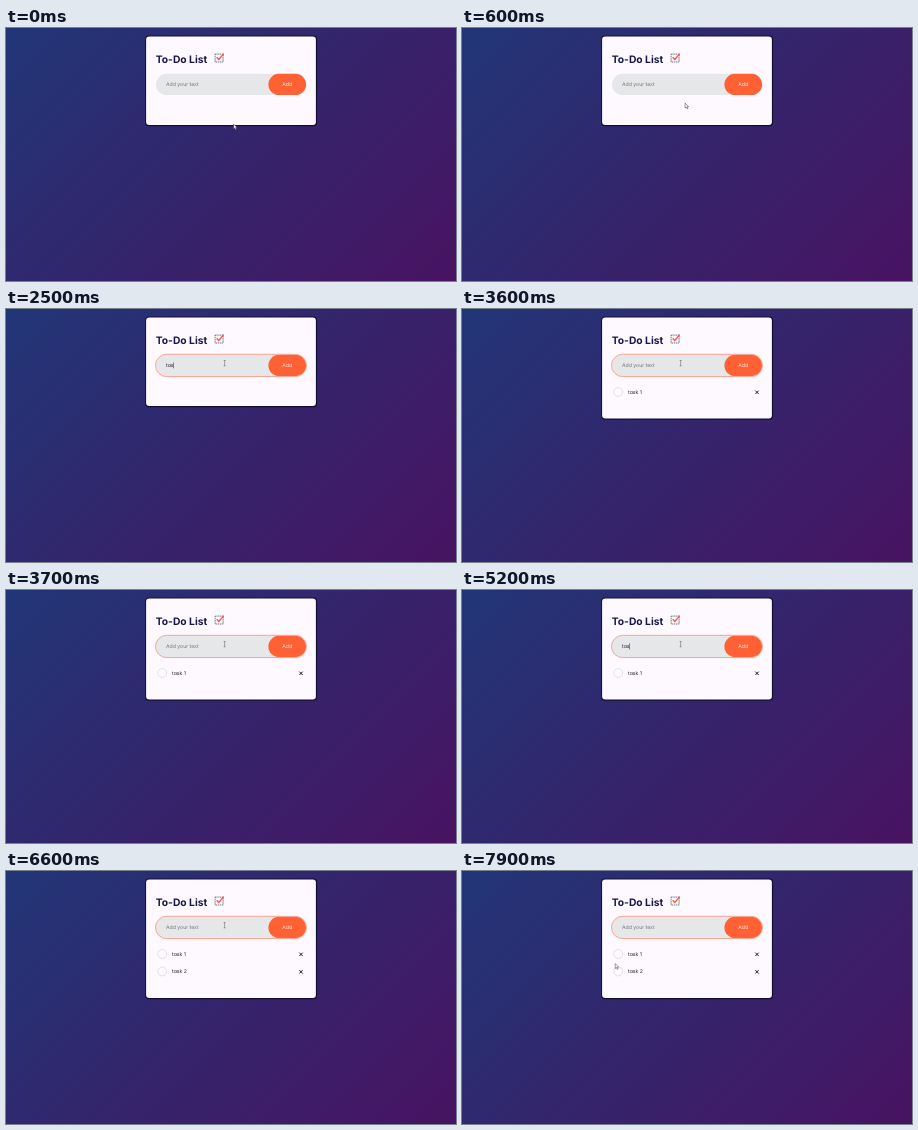
Animation of 450 by 253 pixels, one loop 8000 ms. Source, as an HTML page:

```html
<!DOCTYPE html>
<html lang="en">
<head>
<meta charset="utf-8">
<title>To-Do List</title>
<style>
  html, body { margin: 0; width: 100%; height: 100%; overflow: hidden; }
  body { background: linear-gradient(135deg, #213677, #481361); }
  svg { display: block; width: 100%; height: 100%; }
  text {
    font: 5.15px Inter, "Open Sans", sans-serif;
    font-feature-settings: "cv11", "ss03";
    fill: #25232c;
    white-space: pre;
    text-rendering: geometricPrecision;
  }
  .title { font-size: 10.3px; font-weight: 700; fill: #171848; }
  .hint { fill: #77777c; }
  .button { fill: #fff1ea; }
  #shadow { filter: blur(.4px); }
</style>
</head>
<body>
<svg viewBox="0 0 450 253">
  <rect id="shadow" x="139.2" y="7.6" width="171.9" rx="3.8" fill="#120e33"/>
  <rect id="card" x="140.1" y="8.5" width="169.8" rx="3.2" fill="#fdf9ff"/>

  <text class="title" x="149.7" y="34.7">To-Do List</text>
  <g fill="none">
    <rect x="209.1" y="26.1" width="8" height="7.9" stroke="#3a3b50" stroke-width=".7" stroke-dasharray="1.5 .7"/>
    <path d="M210.7 29.2 L212.8 31.5 L217.8 25.7" stroke="#f25545" stroke-width="1.3"/>
  </g>

  <rect x="150" y="45.8" width="150" height="21.3" rx="10.65" fill="#e6e7e9"/>
  <rect x="262.4" y="45.8" width="37.7" height="21.3" rx="10.65" fill="#ff6034"/>
  <rect id="ring" x="149.5" y="45.3" width="151" height="22.3" rx="11.15" fill="none" stroke="#f3a391" stroke-width="1"/>
  <text class="button" x="281.2" y="58.1" text-anchor="middle">Add</text>
  <text id="hint" class="hint" x="160" y="58.1">Add your text</text>
  <text id="typed" x="160" y="58.1"></text>
  <rect id="caret" y="53.4" width=".5" height="6" fill="#222"/>

  <g id="items"></g>

  <g id="arrow">
    <path d="M0 0 V4.9 L1.2 3.9 L2 5.7 L2.9 5.3 L2.1 3.6 H3.5 Z" fill="#fff" stroke="#222" stroke-width=".45"/>
  </g>
  <path id="beam" d="M-1 -2.7 H1 M0 -2.7 V2.7 M-1 2.7 H1" fill="none" stroke="#555" stroke-width=".5"/>
</svg>
<script>
const LOOP = 8000, TICK = 100;
const $ = id => document.getElementById(id);
const [shadow, card, ring, hint, typed, caret, items, arrow, beam] =
  ["shadow", "card", "ring", "hint", "typed", "caret", "items", "arrow", "beam"].map($);

const itemMarkup = (label, y) => `
  <g transform="translate(0 ${y})">
    <circle cx="156.2" cy="0" r="4.4" fill="#fefbff" stroke="#ddd6e4" stroke-width=".8"/>
    <text x="166" y="1.9">${label}</text>
    <path d="M293.3 -1.4 l3.4 3.4 m0 -3.4 l-3.4 3.4" stroke="#17151f" stroke-width=".95"/>
  </g>`;
items.innerHTML = itemMarkup("task 1", 83) + itemMarkup("task 2", 100.5);

// [time, value] pairs; the last one reached holds
const typing = [
  [0, ""], [2200, "t"], [2300, "ta"], [2500, "tas"], [2700, "task"], [2900, "task "], [3000, "task 1"],
  [3600, ""], [4900, "t"], [5000, "ta"], [5200, "tas"], [5400, "task"], [5600, "task "], [5800, "task 2"],
  [6600, ""]
];
const caretShown = [
  [0, false], [1000, true], [1500, false], [2100, true], [3600, false], [4100, true],
  [4600, false], [4900, true], [6400, false], [6900, true], [7400, false]
];
const taskCount = [[0, 0], [3600, 1], [6600, 2]];
const cardBottom = [97, 109.5, 127];

const at = (steps, t) => steps.filter(s => s[0] <= t).pop()[1];
const ease = p => p * p * (3 - 2 * p);
const progress = (t, from, to) => ease(Math.min(1, Math.max(0, (t - from) / (to - from))));
const show = (el, on) => el.setAttribute("visibility", on ? "visible" : "hidden");
const place = (el, x, y) => el.setAttribute("transform", `translate(${x} ${y})`);

function pointer(t) {
  const enter = progress(t, 200, 1000), leave = progress(t, 7500, 7900);
  return [
    227.6 - 9 * enter - 65.4 * leave,
    96 - 41.8 * enter + 38.4 * leave
  ];
}

function draw(t) {
  const text = at(typing, t), count = at(taskCount, t);
  const height = cardBottom[count] - 8.5;
  card.setAttribute("height", height);
  shadow.setAttribute("height", height + 2.1);
  [...items.children].forEach((item, i) => show(item, i < count));

  show(ring, t >= 1000);
  show(hint, !text);
  if (typed.textContent !== text) typed.textContent = text;
  caret.setAttribute("x", 160 + (text ? typed.getComputedTextLength() : -.3));
  show(caret, at(caretShown, t));

  const [x, y] = pointer(t);
  const overInput = y > 46 && y < 67.2 && x > 150 && x < 262;
  place(arrow, x, y);
  place(beam, x, y);
  show(arrow, !overInput);
  show(beam, overInput);
}

const start = performance.now();
function frame() {
  const t = (performance.now() - start) % LOOP;
  draw(Math.floor(t / TICK) * TICK);
  requestAnimationFrame(frame);
}
frame();
</script>
</body>
</html>
```
